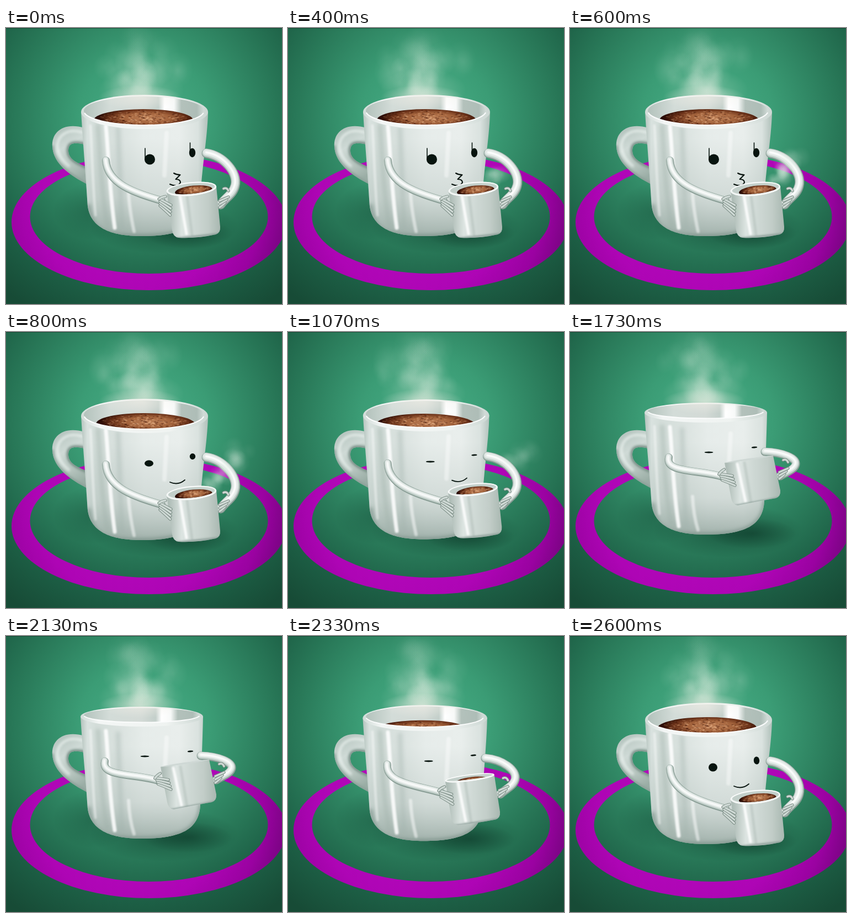
An HTML page with a canvas that plays this animation: 500x500 px, repeating every 2.67 s.

```html
<!DOCTYPE html>
<html lang="en">
<head>
<meta charset="utf-8">
<title>Coffee break</title>
<style>
html, body { margin: 0; width: 100%; height: 100%; overflow: hidden; background: #24694d; }
canvas { display: block; width: 500px; height: 500px; }
</style>
</head>
<body>
<canvas id="stage" width="500" height="500"></canvas>
<script>
const LOOP = 2670, STEPS = 40;
const ctx = document.getElementById('stage').getContext('2d');
const TAU = Math.PI * 2;

const mix = (a, b, k) => a + (b - a) * k;
const mixAll = (a, b, k) => a.map((v, i) => mix(v, b[i], k));

// Eased value at time t from [time, value] pairs.
function track(keys, t) {
  if (t <= keys[0][0]) return keys[0][1];
  for (let i = 1; i < keys.length; i++) {
    const [t0, a] = keys[i - 1], [t1, b] = keys[i];
    if (t <= t1) {
      const u = (t - t0) / (t1 - t0);
      return mix(a, b, u * u * (3 - 2 * u));
    }
  }
  return keys[keys.length - 1][1];
}

function random(seed) {
  return () => (seed = (seed * 16807) % 2147483647) / 2147483647;
}

function addStops(g, stops) {
  stops.forEach(([at, color]) => g.addColorStop(at, color));
  return g;
}

function linear(x0, y0, x1, y1, ...stops) {
  return addStops(ctx.createLinearGradient(x0, y0, x1, y1), stops);
}

function radial(x, y, r, ...stops) {
  return addStops(ctx.createRadialGradient(x, y, 0, x, y, r), stops);
}

function oval(x, y, rx, ry, fill, turn = 0) {
  ctx.beginPath();
  ctx.ellipse(x, y, Math.max(rx, 0), Math.max(ry, 0), turn, 0, TAU);
  if (fill) { ctx.fillStyle = fill; ctx.fill(); }
}

function puff(x, y, r, alpha, rgb = '222,238,226', squash = 1) {
  if (alpha <= 0) return;
  ctx.save();
  ctx.translate(x, y);
  ctx.scale(1, squash);
  oval(0, 0, r, r, radial(0, 0, r, [0, `rgba(${rgb},${alpha})`], [.5, `rgba(${rgb},${alpha * .5})`], [1, `rgba(${rgb},0)`]));
  ctx.restore();
}

function soft(blur, draw) {
  ctx.save();
  ctx.filter = `blur(${blur}px)`;
  draw();
  ctx.restore();
}

function line(path, color, width) {
  ctx.strokeStyle = color;
  ctx.lineWidth = width;
  ctx.lineCap = ctx.lineJoin = 'round';
  ctx.stroke(path instanceof Path2D ? path : new Path2D(path));
}

function scene() {
  ctx.fillStyle = radial(250, 165, 400, [0, '#48b088'], [.3, '#3b9c75'], [.6, '#287757'], [.78, '#1d6046'], [1, '#174b36']);
  ctx.fillRect(0, 0, 500, 500);
  ctx.fillStyle = 'rgba(10,50,34,.6)';
  ctx.fillRect(0, 0, 500, 1);

  ctx.beginPath();
  ctx.ellipse(259, 351.5, 249, 123.5, 0, 0, TAU);
  ctx.ellipse(259, 342, 215.5, 103, 0, 0, TAU);
  ctx.fillStyle = radial(230, 310, 290, [0, '#b80cc0'], [.6, '#ae05b5'], [.82, '#9a02a1'], [1, '#74047d']);
  ctx.fill('evenodd');
}

function shadow(p) {
  puff(160, 332, 75, .3, '8,45,32', .7);
  puff(285, 360, 135, .5, '8,45,32', .36);
  puff(330, mix(372, 365, p), 80, .45, '8,45,32', .35);
}

function handle() {
  const shape = new Path2D('M142 181C105 170 82 188 84 215C86 247 118 268 147 283L144 251C125 243 113 236 113 222C113 207 125 207 142 211Z');
  ctx.fillStyle = linear(84, 180, 140, 270, [0, '#aebeb8'], [.4, '#cfdad6'], [.7, '#b9c7c1'], [1, '#9aada5']);
  ctx.fill(shape);
  ctx.save();
  ctx.clip(shape);
  soft(2, () => {
    line('M142 211C125 207 113 207 113 222C113 236 125 243 146 252', '#7a9088', 7);
    line('M84 215C86 247 118 268 147 283', '#8a9f97', 5);
    line('M138 189C112 181 94 194 93 214C94 228 103 241 114 250', 'rgba(245,250,248,.65)', 4);
  });
  ctx.restore();
}

const speckRand = random(77);
const specks = Array.from({ length: 420 }, () => {
  const a = speckRand() * TAU, d = Math.sqrt(speckRand());
  return [Math.cos(a) * d, Math.sin(a) * d, .5 + speckRand() * .9, speckRand()];
});

function coffee(x, y, rx, ry, turn, share = 1) {
  ctx.save();
  ctx.translate(x, y);
  ctx.rotate(turn);
  ctx.scale(rx, ry);
  oval(0, 0, 1, 1, radial(.08, -.2, 1.05, [0, '#bd7f56'], [.45, '#a2623b'], [.72, '#6b3219'], [.92, '#300e05'], [1, '#260a04']));
  ctx.scale(1 / rx, 1 / ry);
  specks.slice(0, specks.length * share).forEach(([u, v, r, tone]) => {
    const fill = tone > .45 ? `rgba(232,180,138,${.6 - Math.hypot(u, v) * .45})` : 'rgba(64,22,8,.4)';
    oval(u * rx * .94, v * ry * .9, r * 2, r * .8, fill);
  });
  ctx.restore();
}

function mug(p, q, slosh) {
  const [x, y, rx, ry, bottom] = mixAll([251, 152, 115, 31, 377], [246, 146, 111, 18, 367], p);
  const left = x - rx, right = x + rx, knee = bottom - 60;
  const body = new Path2D(
    `M${left} ${y}C${left + 4} ${y + 65} 145 ${knee - 45} 147.5 ${knee}` +
    `C150 ${bottom - 15} 190 ${bottom} 245 ${bottom}` +
    `C318 ${bottom} 349 ${bottom - 17} 352 ${knee}` +
    `C353 ${knee - 55} ${right - 1} ${y + 50} ${right} ${y}Z`);
  ctx.fillStyle = linear(136, 0, 364, 0, [0, '#b5c4be'], [.05, '#d9e2df'], [.12, '#d3ddd9'],
    [.3, '#dae2df'], [.5, '#e6ecea'], [.78, '#e9eeec'], [.93, '#dae2df'], [1, '#b5c4be']);
  ctx.fill(body);

  ctx.save();
  ctx.clip(body);
  ctx.fillStyle = linear(0, 200, 0, bottom, [0, 'rgba(150,168,162,0)'], [.6, 'rgba(145,164,157,.25)'], [1, 'rgba(115,138,129,.6)']);
  ctx.fillRect(120, 190, 260, 200);
  soft(3, () => {
    line(`M167 ${y + 26}C170 220 173 300 184 ${bottom - 18}`, 'rgba(157,174,168,.4)', 9);
    line(`M203 ${y + 31}C204 220 207 280 210 ${bottom - 15}`, 'rgba(160,178,171,.35)', 9);
  });
  soft(1.5, () => {
    line(`M181 ${y + 26}C185 215 187 290 197 ${bottom - 15}`, 'rgba(255,255,255,.85)', 7);
    line(`M153 ${y + 25}C155 210 157 280 162 ${knee + 22}`, 'rgba(255,255,255,.4)', 5);
    line(`M222 298C223 320 226 340 232 ${bottom - 8}`, 'rgba(255,255,255,.5)', 6);
    line(`M291 ${y + 38}L287 ${knee - 50}`, 'rgba(255,255,255,.4)', 8);
  });
  soft(3, () => line(`M150 ${knee + 5}C155 ${bottom} 190 ${bottom} 245 ${bottom}C318 ${bottom} 350 ${bottom - 17} 352 ${knee}`, 'rgba(110,134,125,.65)', 6));
  ctx.restore();

  oval(x, y, rx, ry, linear(left, 0, right, 0, [0, '#d0dbd7'], [.15, '#f3f6f5'], [.7, '#eff3f1'], [1, '#ccd7d3']));
  const [ox, oy, orx, ory] = mixAll([250, 150, 109, 26], [246, 143.5, 105, 13], p);
  ctx.save();
  oval(ox, oy, orx, ory);
  ctx.clip();
  ctx.fillStyle = linear(ox - orx, 0, ox + orx, 0, [0, '#b3c2bc'], [.22, '#d3dcd8'], [.5, '#d3dad6'],
    [.62, '#c3cfca'], [.67, '#ffffff'], [.75, '#f7f9f8'], [.81, '#b3c1bb'], [.94, '#aebdb7'], [1, '#d3ddd9']);
  ctx.fillRect(100, 100, 300, 90);
  coffee(mix(249 + slosh, 237, p), mix(167, 177, q), 90, 20, slosh * .002);
  ctx.restore();
  ctx.beginPath();
  ctx.ellipse(ox, oy, orx, ory, 0, .15, Math.PI - .15);
  ctx.strokeStyle = '#fbfcfc';
  ctx.lineWidth = 2;
  ctx.stroke();
  puff(243, 126, 75, .6, '240,238,230', .3);
}

function face(p, t) {
  const ink = '#08140f';
  if (t < 670) {
    oval(260.5, 238, 9.5, 9.5, ink);
    oval(337.5, 226, 5.7, 8.3, ink);
    line('M252 218V239M333.5 208V227', ink, 1.6);
    line('M304 263Q309 266 315.5 266L307.5 274Q316 274 316 280Q311 289 297 283', ink, 2.1);
    return;
  }
  const open = track([[730, 7.5], [930, 1.5], [2330, 1.5], [2530, 7.5]], t);
  const [lx, ly, rx, ry] = mixAll([259, 238, 338, 225.5], [251.5, 218, 334, 209], p);
  oval(lx, ly, 8, open, ink);
  oval(rx, ry, 5.2, Math.max(open * .95, 1.3), ink, -.08);
  const y = -22 * p;
  if (p < .6) line(`M297 ${272 + y}Q312 ${278.5 + y} 324 ${268 + y}`, ink, 1.8);
}

function tube(n, width) {
  const path = new Path2D(`M${n[0]} ${n[1]}C${n.slice(2).join(' ')}`);
  line(path, '#8a9e96', width);
  ctx.save();
  ctx.translate(-.4, -1);
  line(path, '#c3d0cb', width - 2.5);
  ctx.translate(-.2, -.9);
  line(path, '#e2e9e6', width - 6);
  soft(1, () => line(path, '#ffffff', width * .22));
  ctx.restore();
}

function arms(p, q) {
  const [, , a, b] = [0, 0, p, q];
  const rightTop = mixAll([363, 227, 395, 232, 421, 263], [353, 217, 386, 218, 411, 229], a);
  const rightEnd = mixAll([415, 286, 411, 302, 398, 307, 389, 320], [409, 240, 406, 250, 394, 253, 381, 261], b);
  tube([...rightTop, ...rightEnd], mix(17, 15, p));
  const leftTop = mixAll([181, 240, 184, 283], [179, 227, 172, 256], a);
  const leftEnd = mixAll([232, 298, 282, 313], [232, 249, 275, 262], b);
  tube([...leftTop, ...leftEnd], 14);
}

function cup(q) {
  const [ax, ay, bx, by, cx, cy, dx, dy, ry, bow] = mixAll(
    [291, 296, 381, 287, 389, 372, 303, 381, 12, 2],
    [280, 237, 368, 224, 382, 299, 294, 315, 1.5, 0], q);
  const body = new Path2D(
    `M${ax} ${ay}L${dx - 2} ${dy - 14}Q${dx} ${dy - 2} ${dx + 10} ${dy - 1}` +
    `Q${(cx + dx) / 2} ${(cy + dy) / 2 + bow * 2.5} ${cx - 9} ${cy + 2}` +
    `Q${cx} ${cy - 1} ${cx - 1} ${cy - 12}L${bx} ${by}Z`);
  const shade = ['#aebcb6', '#dce4e1', '#ced8d4', '#c2cdc8', '#a8b7b0'];
  ctx.fillStyle = linear(ax + 4, 0, cx, 0, ...shade.map((c, i) => [i / 4, c]));
  ctx.fill(body);
  ctx.save();
  ctx.clip(body);
  soft(1.5, () => {
    line(`M${ax + 23} ${ay + 2}L${dx + 24} ${dy - 8}`, 'rgba(255,255,255,.85)', 5);
    line(`M${ax + 36} ${ay}L${dx + 34} ${dy - 6}`, 'rgba(160,176,170,.35)', 5);
    line(`M${dx} ${dy + 1}L${cx} ${cy + 1}`, 'rgba(125,145,138,.7)', 4);
  });
  ctx.restore();

  const x = (ax + bx) / 2, y = (ay + by) / 2;
  const turn = Math.atan2(by - ay, bx - ax), rx = Math.hypot(bx - ax, by - ay) / 2;
  oval(x, y, rx, ry, q > .6 ? '#cfd8d5' : '#ebf0ee', turn);
  if (ry > 4) {
    ctx.save();
    oval(x, y - .6, rx - 3, ry - 2.6, '#c3cfca', turn);
    ctx.clip();
    coffee(x + 4, y + 3.5 + q * 8, 34, 9.5, turn, .25);
    ctx.restore();
    oval(x, y, rx - .5, ry - .5, null, turn);
    ctx.strokeStyle = 'rgba(255,255,255,.9)';
    ctx.lineWidth = 1.4;
    ctx.stroke();
  }
}

function finger(x0, y0, mx, my, x1, y1) {
  const d = `M${x0} ${y0}Q${mx} ${my} ${x1} ${y1}`;
  line(d, '#75877f', 5.2);
  line(d, '#cfd9d5', 3.4);
}

function hands(q) {
  const [lx, ly, rx, ry] = mixAll([279, 311, 390, 309], [272, 258, 382, 250], q);
  ctx.save();
  ctx.translate(lx, ly);
  ctx.rotate(-.35 * q);
  for (let i = 3; i >= 0; i--) finger(0, i * 4 - 1, 8, i * 5 + 3, 20 - i * .5, i * 6 + 10);
  finger(-2, -1, 3, -5, 10, -6);
  ctx.restore();
  ctx.save();
  ctx.translate(rx, ry);
  for (let i = 2; i >= 0; i--) finger(13 - i * 3, -3 + i * 5, 4, 1 + i * 5, -3, 4 + i * 6);
  finger(13, -14, 10, -21, 4, -18);
  ctx.restore();
}

const steamRand = random(2024);
const wisps = Array.from({ length: 52 }, () => ({
  phase: steamRand(), side: steamRand() * 2 - 1, size: steamRand(), sway: steamRand() * TAU
}));

function steam(t) {
  puff(245, 112, 78, .3, '222,232,218', .5);
  wisps.forEach(({ phase, side, size, sway }) => {
    const age = (t / LOOP + phase) % 1;
    const spread = 15 + 65 * Math.sin(Math.PI * age * .95) ** 2 * Math.abs(side);
    const x = 246 + side * spread - age * 10 + Math.sin(age * 7 + sway) * 5;
    const y = 130 - age * 118;
    const fade = Math.min(1, age * 6) * Math.pow(1 - age, .8);
    puff(x, y, 12 + size * 15 + age * 7, fade * (.31 - .14 * Math.abs(side)), '212,232,217', 1.2);
  });
}

function blownSteam(t) {
  wisps.slice(0, 32).forEach(({ phase, side, size }) => {
    const age = (t - 250 - phase * 500) / 500;
    if (age <= 0 || age >= 1) return;
    const x = 362 + 72 * age + side * (8 + 11 * age);
    const y = 284 - 76 * age + side * 8 * Math.cos(size * 9);
    puff(x, y, 9 + size * 9 + age * 6, .3 * Math.min(1, age * 5) * (1 - age * .85));
  });
}

function draw(t) {
  const tilt = track([[960, 0], [1400, 1], [2130, 1], [2570, 0]], t);
  const sip = track([[950, 0], [1560, 1], [2130, 1], [2570, 0]], t);
  const slosh = track([[0, 0], [800, 4], [1400, 0], [2330, -5], [2670, 0]], t);
  scene();
  shadow(tilt);
  steam(t);
  handle();
  mug(tilt, sip, slosh);
  face(tilt, t);
  arms(tilt, sip);
  cup(sip);
  hands(sip);
  blownSteam(t);
}

const starts = Array.from({ length: STEPS }, (_, i) => Math.round(i * 20 / 3) * 10);
let shown = -1;

function tick() {
  const t = performance.now() % LOOP;
  let step = STEPS - 1;
  while (starts[step] > t) step--;
  if (step !== shown) draw(starts[shown = step]);
  requestAnimationFrame(tick);
}
tick();
</script>
</body>
</html>
```
